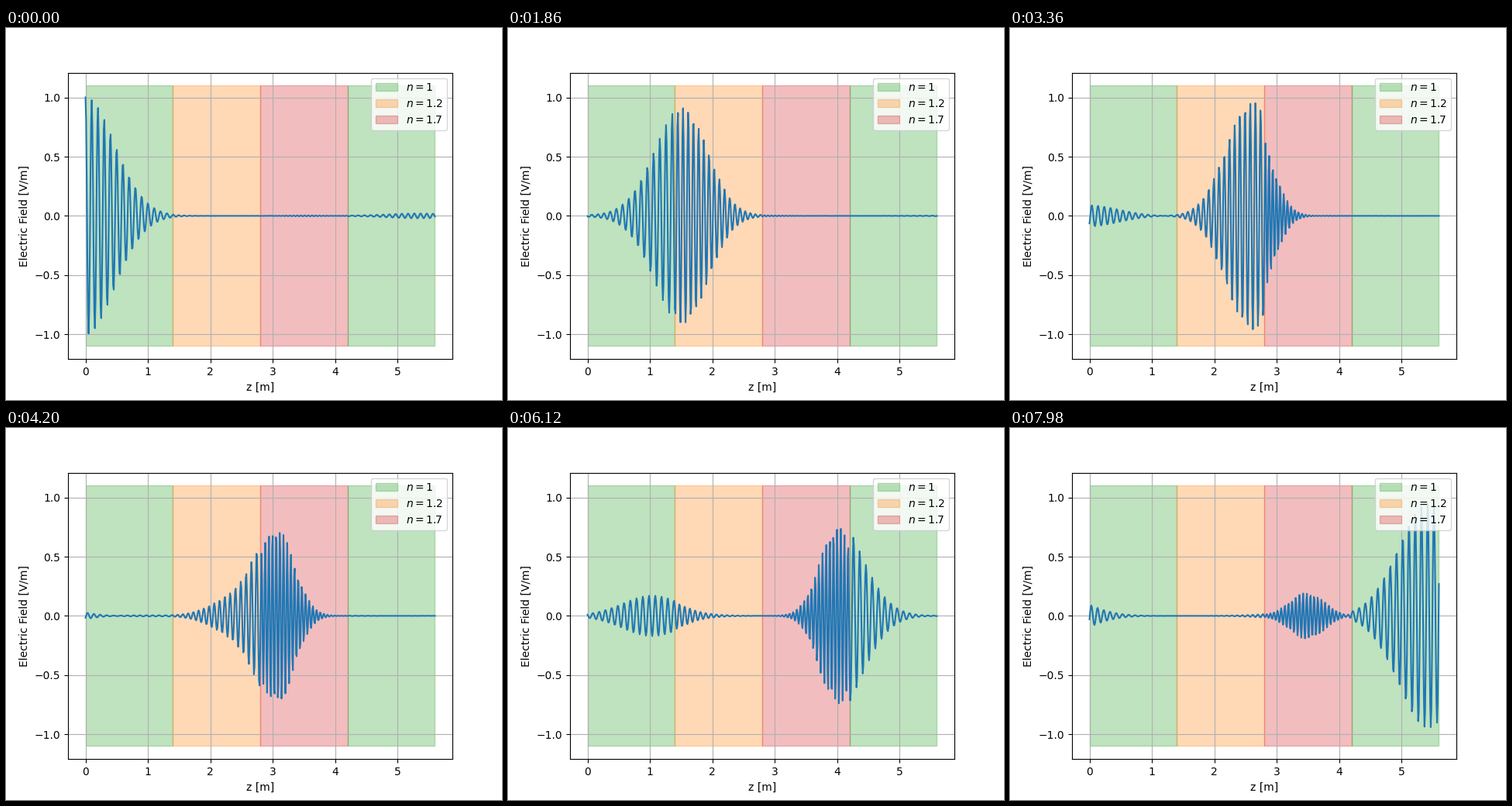
Write a matplotlib script that moves like this. It is 640 px wide and 480 px high and loops after 8 s.

```python
import numpy as np
import matplotlib.pyplot as plt
from matplotlib.animation import FuncAnimation

C = 0.3                 # speed of light, m/ns
WIDTH = 1.4             # layer thickness, m
INDICES = [1.0, 1.2, 1.7, 1.0]
COLORS = ["tab:green", "tab:orange", "tab:red", "tab:green"]
LABELS = ["$n=1$", "$n=1.2$", "$n=1.7$", None]
DT = 0.16742            # time step, ns
TICK = 20               # ms per drawn frame
HOLD = 3                # drawn frames per time step
FRAMES = 400

# Gaussian pulse as a comb of frequencies (GHz)
freq = np.linspace(2.5, 3.5, 50)
weight = np.exp(-((freq - 3.0) / 0.1) ** 2 / 2)
weight /= weight.sum()
wavenumber = 2 * np.pi * freq / C


def layer_amplitudes():
    """Forward and backward wave at the left edge of every layer."""
    fwd = np.ones_like(freq, dtype=complex)
    back = np.zeros_like(fwd)
    waves = [(fwd, back)]
    for n, n_next in zip(INDICES[-2::-1], INDICES[:0:-1]):
        field = fwd + back
        slope = (fwd - back) * n_next / n
        shift = np.exp(1j * wavenumber * n * WIDTH)
        fwd = (field + slope) / 2 / shift
        back = (field - slope) / 2 * shift
        waves.insert(0, (fwd, back))
    incident = waves[0][0]
    return [(a / incident, b / incident) for a, b in waves]


depth = np.linspace(0, WIDTH, 140)
parts = []
for n, (a, b) in zip(INDICES, layer_amplitudes()):
    phase = np.exp(1j * n * np.outer(depth, wavenumber))
    parts.append(a * phase + b / phase)
modes = np.vstack(parts) * weight
z = np.concatenate([depth + i * WIDTH for i in range(len(INDICES))])


def field_at(step):
    return (modes @ np.exp(-2j * np.pi * freq * step * DT)).real


fig, ax = plt.subplots(figsize=(6.4, 4.8), dpi=100)
for i, (color, label) in enumerate(zip(COLORS, LABELS)):
    ax.fill_between([i * WIDTH, (i + 1) * WIDTH], -1.1, 1.1,
                    color=color, alpha=0.3, label=label)
line, = ax.plot(z, field_at(0), color="tab:blue")
ax.set_xlim(-0.28, 5.88)
ax.set_ylim(-1.21, 1.21)
ax.set_xlabel("z [m]")
ax.set_ylabel("Electric Field [V/m]")
ax.grid(True)
ax.legend(loc="upper right")


def update(frame):
    line.set_ydata(field_at(frame // HOLD))
    return line,


anim = FuncAnimation(fig, update, frames=FRAMES, interval=TICK,
                     repeat=True, repeat_delay=0)
plt.show()
```
